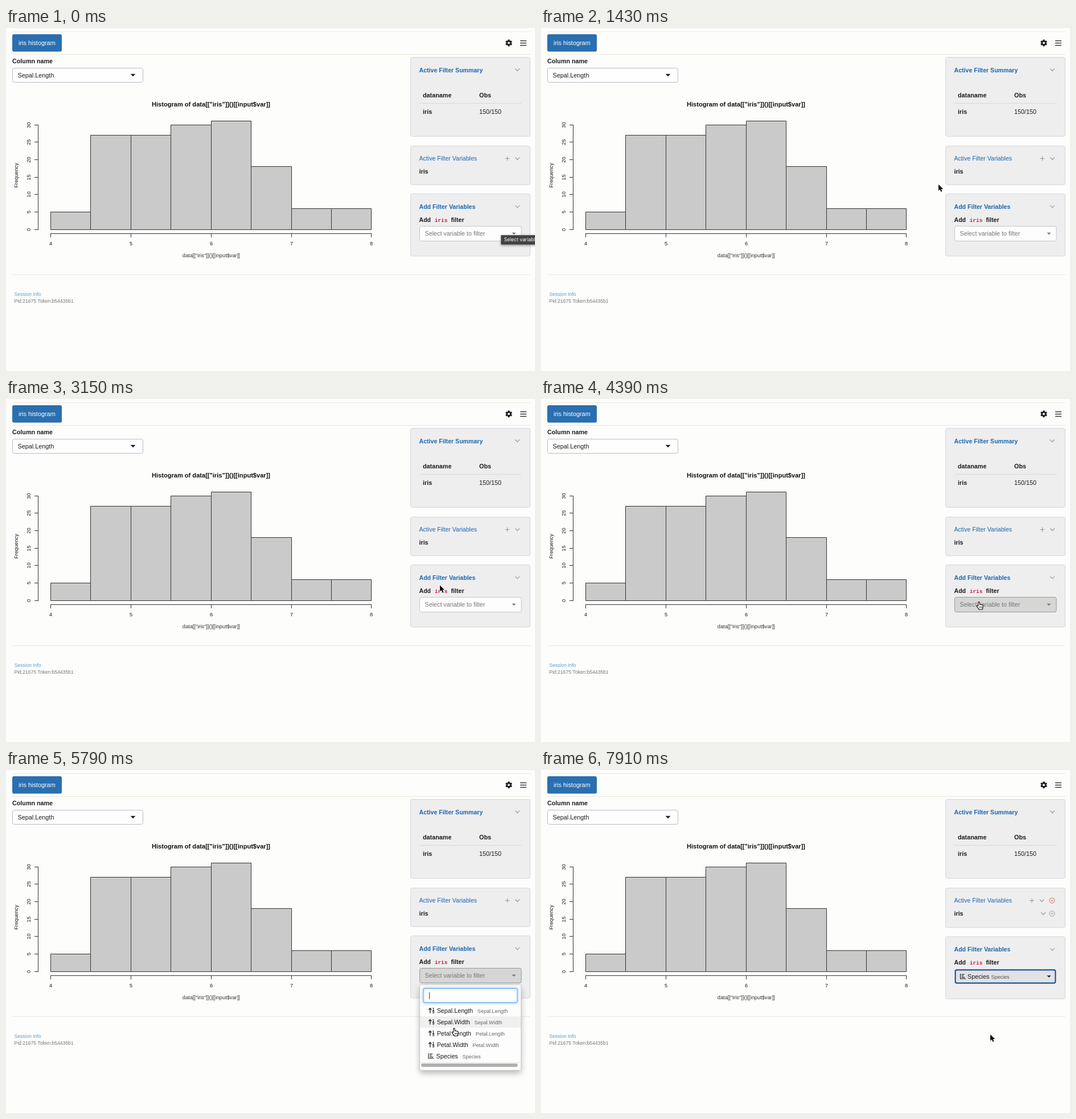
An HTML page with a canvas that plays this animation: 929x603 px, repeating every 8 s.

```html
<!DOCTYPE html>
<html lang="en">
<head>
<meta charset="utf-8">
<title>iris histogram</title>
<style>
html, body { margin: 0; width: 100%; height: 100%; overflow: hidden; background: #fdfdfc; }
canvas { display: block; }
</style>
</head>
<body>
<canvas id="stage" width="929" height="603"></canvas>
<script>
const ctx = document.getElementById('stage').getContext('2d');
const SANS = '"Liberation Sans", Arial, sans-serif';
const MONO = '"Liberation Mono", monospace';
const INK = '#1c1c1e', BLUE = '#1c67b0', GREY = '#96969a';
const LOOP = 8000;
const TIP_END = 950, OPEN = 4700, CLOSE = 7400, GROW = 7440, FOCUS = 7640;
const HAND_FROM = 4330, HAND_TO = 7630;

// Pointer path: time, x, y of the hot spot
const PATH = [
  [900, 930, 372], [1150, 815, 290], [1320, 722, 236], [1430, 698, 275],
  [1710, 698, 277], [2300, 759, 339], [2410, 760, 341], [2700, 760, 341],
  [3200, 762, 327], [4130, 761, 326], [4360, 769, 357], [5150, 769, 358],
  [5790, 787, 454.5], [6150, 790, 480], [6600, 793, 508], [6950, 793, 500],
  [7590, 793, 500], [7880, 789, 465], [8000, 789, 465]
];
const ROWS = ['Sepal.Length', 'Sepal.Width', 'Petal.Length', 'Petal.Width', 'Species'];

function text(s, x, y, size, color = INK, weight = '', family = SANS) {
  ctx.font = `${weight} ${size}px ${family}`;
  ctx.fillStyle = color;
  ctx.fillText(s, x, y);
  return ctx.measureText(s).width;
}
function centered(s, x, y, size, color, weight) {
  ctx.textAlign = 'center';
  text(s, x, y, size, color, weight);
  ctx.textAlign = 'left';
}
function line(color, width, ...p) {
  ctx.beginPath();
  for (let i = 0; i < p.length; i += 2) ctx.lineTo(p[i], p[i + 1]);
  ctx.strokeStyle = color;
  ctx.lineWidth = width;
  ctx.stroke();
}
function box(x, y, w, h, r, fill, stroke, width = 1) {
  ctx.beginPath();
  ctx.roundRect(x, y, w, h, r);
  if (fill) { ctx.fillStyle = fill; ctx.fill(); }
  if (stroke) { ctx.strokeStyle = stroke; ctx.lineWidth = width; ctx.stroke(); }
}
function shadowed(color, blur, dy, draw) {
  ctx.save();
  ctx.shadowColor = color;
  ctx.shadowBlur = blur;
  ctx.shadowOffsetY = dy;
  draw();
  ctx.restore();
}
function triangle(x, y, w, color) {
  ctx.beginPath();
  ctx.moveTo(x - w, y - w / 2);
  ctx.lineTo(x + w, y - w / 2);
  ctx.lineTo(x, y + w / 2);
  ctx.fillStyle = color;
  ctx.fill();
}
const chevron = (x, y) => line(GREY, 1.1, x - 3.8, y - 2, x, y + 2, x + 3.8, y - 2);
function plus(x, y) {
  line(GREY, 1, x - 4, y, x + 4, y);
  line(GREY, 1, x, y - 4, x, y + 4);
}
function crossCircle(x, y, color) {
  ctx.beginPath();
  ctx.arc(x, y, 4.6, 0, 7);
  ctx.strokeStyle = color;
  ctx.lineWidth = 1;
  ctx.stroke();
  line(color, 1, x - 1.7, y - 1.7, x + 1.7, y + 1.7);
  line(color, 1, x - 1.7, y + 1.7, x + 1.7, y - 1.7);
}
function gear(x, y) {
  ctx.save();
  ctx.translate(x, y);
  for (let i = 0; i < 6; i++) {
    box(-1.6, -6, 3.2, 4, .7, '#222');
    ctx.rotate(Math.PI / 3);
  }
  ctx.beginPath();
  ctx.arc(0, 0, 3.3, 0, 7);
  ctx.strokeStyle = '#222';
  ctx.lineWidth = 2.6;
  ctx.stroke();
  ctx.restore();
}

function header() {
  line('#ebebdd', 1, 11, 6.5, 921, 6.5);
  line('#e8e8d8', 1, 11, 46.5, 921, 46.5);
  box(11, 11, 87, 30.5, 3, '#2a6fb0', null);
  text('iris histogram', 22, 30, 10.9, '#fff');
  gear(883, 26.3);
  for (const y of [22.5, 26.5, 30.5]) line('#222', 1.3, 903, y, 914, y);
  text('Column name', 11, 62, 10.75, INK, 'bold');
  box(11.5, 70.5, 229, 25, 3, '#fefefe', '#bcbcc4');
  text('Sepal.Length', 20.5, 87, 10.85);
  triangle(223, 83, 4.4, INK);
}

function histogram() {
  const snap = v => Math.floor(v) + .5;
  const px = v => snap(78.5 + (v - 4) * 140.85);
  const py = n => snap(354 - n * 6.133);
  centered('Histogram of data[["iris"]]()[[input$var]]', 360, 138.3, 11.08, '#111', 'bold');
  [5, 27, 27, 30, 31, 18, 6, 6].forEach((n, i) => {
    const x = px(4 + i / 2);
    box(x, py(n), px(4.5 + i / 2) - x, py(0) - py(n), 0, '#cacaca', '#33332f', 1);
  });
  line('#333', 1, 56.5, py(0), 56.5, py(30));
  for (let n = 0; n <= 30; n += 5) {
    line('#333', 1, 50, py(n), 57, py(n));
    upward(String(n), 43, py(n));
  }
  line('#333', 1, px(4), 361.5, px(8), 361.5);
  for (let v = 4; v <= 8; v++) {
    line('#333', 1, px(v), 361, px(v), 368);
    centered(String(v), px(v), 382, 9.24);
  }
  upward('Frequency', 20.5, 259);
  centered('data[["iris"]]()[[input$var]]', 360.3, 403.3, 9.24, '#333');
}
function upward(s, x, y) {
  ctx.save();
  ctx.translate(x, y);
  ctx.rotate(-Math.PI / 2);
  centered(s, 0, 0, 9.24);
  ctx.restore();
}

function footer() {
  line('#e8e8e4', 1, 11, 433.5, 921, 433.5);
  text('Session Info', 14.5, 470.6, 8.55, '#5b9fca');
  text('Pid:21675 Token:b54435b1', 14.5, 482.6, 8.55, '#77777a');
}

const card = (y, h) => box(710.5, y + .5, 210, h, 3, '#eeeeef', '#d6d6dc');

function panels(t) {
  const grown = t >= GROW, dy = grown ? 1.5 : 0;
  card(51, 139);
  text('Active Filter Summary', 725.5, 77.5, 10.6, BLUE, 'bold');
  chevron(898, 73.5);
  text('dataname', 732, 122, 10.8, INK, 'bold');
  text('Obs', 831, 122, 10.8, INK, 'bold');
  line('#d8d8dc', 1, 726, 132.5, 905, 132.5);
  text('iris', 732, 150.5, 10.8, INK, 'bold');
  text('150/150', 831, 150.5, 10.8);

  card(207, 68 + dy);
  text('Active Filter Variables', 725.5, 233.3, 10.6, BLUE);
  text('iris', 725.5, 256.3, 10.7, INK, 'bold');
  if (grown) {
    plus(862, 229.5);
    chevron(879.5, 229.5);
    crossCircle(897.5, 229.5, '#c0705f');
    chevron(882, 252.5);
    crossCircle(897.5, 252.5, GREY);
  } else {
    plus(880.5, 229.5);
    chevron(898, 229.5);
  }

  ctx.save();
  ctx.translate(0, dy);
  card(291, 109.5);
  text('Add Filter Variables', 725.5, 317.6, 10.6, BLUE, 'bold');
  chevron(898, 313.8);
  text('Add', 725.5, 340.8, 10.6, INK, 'bold');
  text('iris', 752.8, 340.6, 9.4, '#c01f3a', 'bold', MONO);
  text('filter', 781.5, 340.8, 10.7, INK, 'bold');
  picker(t);
  ctx.restore();
}

function picker(t) {
  const chosen = t >= CLOSE, active = t >= HAND_FROM;
  if (t >= FOCUS) {
    box(726, 348.5, 179, 26, 4, '#a9bdd6', null);
    box(727.7, 350, 175.6, 23, 3, '#e2e1e6', '#194f8c', 1.8);
  } else {
    box(726.5, 348.5, 178.5, 26, 3, active ? '#d6d6d5' : '#fdfdfd', active ? '#98989a' : '#c6c6cc');
  }
  if (chosen) {
    barsIcon(736, 361.5);
    const w = text('Species', 749, 365.4, 10.8);
    text('Species', 749 + w + 3, 365.4, 9, '#555');
    triangle(892, 361.5, 3.6, INK);
  } else {
    text('Select variable to filter', 735.5, 365.2, 10.75, '#77777b');
    triangle(892, 361.5, 3.6, '#77777b');
  }
}

function barsIcon(x, y) {
  line(INK, 1.1, x + .5, y - 5, x + .5, y + 4, x + 10, y + 4);
  [5, 3.5, 6].forEach((w, i) => line(INK, 1.2, x + 2.5, y - 3.6 + i * 2.6, x + 2.5 + w, y - 3.6 + i * 2.6));
}
function sortIcon(x, y) {
  line(INK, 1.3, x + 2.5, y + 4.5, x + 2.5, y - 4);
  line(INK, 1.3, x, y - 1.5, x + 2.5, y - 4.2, x + 5, y - 1.5);
  text('1', x + 6.5, y - .3, 6.4, INK, 'bold');
  text('9', x + 6.5, y + 4.9, 6.4, INK, 'bold');
}

function menu(t) {
  if (t < OPEN || t >= CLOSE) return;
  shadowed('rgba(0,0,0,.28)', 11, 5, () => box(726.5, 377.5, 178, 150.5, 3, '#fdfdfd', null));
  box(726.5, 377.5, 178, 150.5, 3, '#fdfdfd', '#c8c8ca');
  const field = () => box(733, 384, 165, 25, 3, '#fff', '#7fb2e4', 1.3);
  if (t < 6700) shadowed('rgba(90,160,235,.5)', 5, 0, field);
  else field();
  if ((t - OPEN) % 1000 < 500) line('#444', 1, 743.5, 390.5, 743.5, 403);

  const hover = Math.floor((pointer(t - 60)[1] - 413) / 20);
  const lit = Math.max(0, Math.min(4, hover));
  ctx.fillStyle = '#f0f0ef';
  ctx.fillRect(727, 413 + lit * 20, 177, 20);
  ROWS.forEach((name, i) => {
    const y = 423 + i * 20, last = i === 4, x = last ? 755.5 : 756.7;
    if (last) barsIcon(741.5, y);
    else sortIcon(742.3, y);
    const w = text(name, x, y + 3.8, 10.75);
    text(name, x + w + 7.8, y + 3.6, 9.05, '#666');
  });
  line('#e2e2d8', 1, 727, 514.5, 904, 514.5);
  box(729, 516, 169.5, 6, 3, '#b0b0b0', null);
}

function tooltip(t) {
  if (t >= TIP_END) return;
  shadowed('rgba(0,0,0,.35)', 4, 1, () => box(869.5, 364.5, 120, 16, 0, '#444446', '#66666a'));
  text('Select variable to filter', 874.5, 375.3, 8.6, '#fff', '', 'Inter, ' + SANS);
}

function pointer(t) {
  const i = PATH.findIndex(p => p[0] > t);
  if (i === 0) return PATH[0].slice(1);
  const [t0, x0, y0] = PATH[i - 1], [t1, x1, y1] = PATH[i];
  const u = (t - t0) / (t1 - t0), e = u * u * (3 - 2 * u);
  return [x0 + (x1 - x0) * e, y0 + (y1 - y0) * e];
}

const ARROW = new Path2D('M0 0V11.2L2.6 8.8L4.5 13L6.5 12.1L4.7 8H8.2Z');
const HAND = new Path2D('M-1.2 6.8V.8Q-1.2 -.4 0 -.4T1.2 .8V4.2Q2.4 3.3 3.3 4.5Q4.6 3.8 5.4 5.1' +
  'Q7.2 4.7 7.2 6.5V8.6Q7.2 10.2 6.2 11.6V13H-.2V11.8L-3.8 7.6Q-4.4 6.1 -3.1 6Z');

function cursor(t) {
  if (t < PATH[0][0]) return;
  const [x, y] = pointer(t);
  const hand = t >= HAND_FROM && t < HAND_TO;
  ctx.save();
  ctx.translate(x, y);
  ctx.lineJoin = 'round';
  ctx.lineWidth = hand ? 1.1 : 1.6;
  ctx.strokeStyle = hand ? '#111' : '#fff';
  ctx.fillStyle = hand ? '#fff' : '#0c0c0c';
  const shape = hand ? HAND : ARROW;
  if (hand) ctx.fill(shape);
  ctx.stroke(shape);
  if (hand) for (const fx of [1.4, 3.3, 5.2]) line('#111', .8, fx, 7.5, fx, 10.6);
  else ctx.fill(shape);
  ctx.restore();
}

function frame(now) {
  const t = now % LOOP;
  ctx.fillStyle = '#fdfdfc';
  ctx.fillRect(0, 0, 929, 603);
  header();
  histogram();
  footer();
  panels(t);
  menu(t);
  tooltip(t);
  cursor(t);
  requestAnimationFrame(() => frame(performance.now()));
}
frame(performance.now());
</script>
</body>
</html>
```
